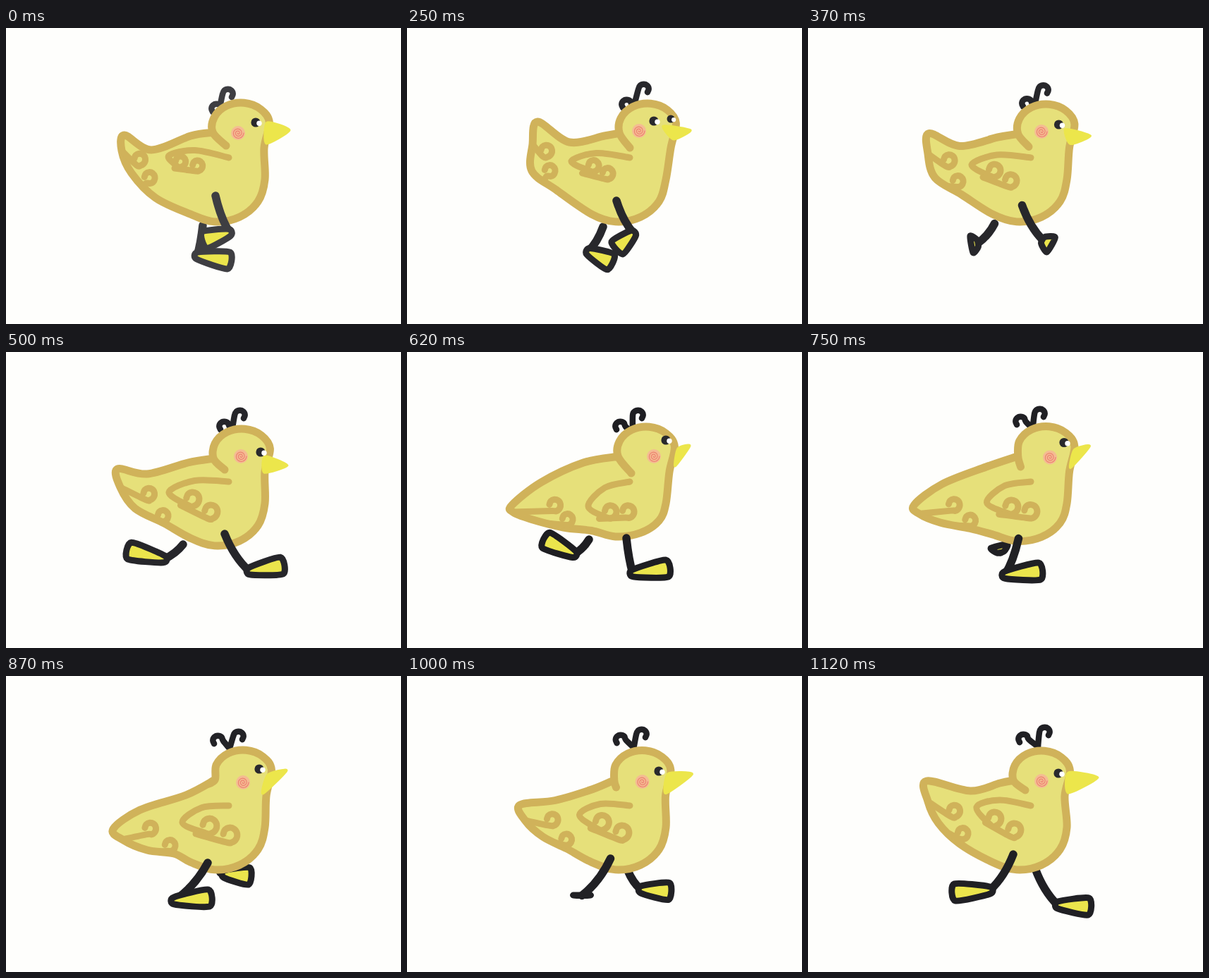
These frames come from a looping animation (560x420 px, 1.25 s). An HTML page:

```html
<!DOCTYPE html>
<html lang="en">
<head>
<meta charset="utf-8">
<title>Running duckling</title>
<style>
html, body { margin: 0; width: 100%; height: 100%; overflow: hidden; background: #fefefc; }
svg { display: block; width: 100%; height: 100%; }
path { fill: none; stroke-linecap: round; stroke-linejoin: round; }
#duck { filter: blur(.7px); }
.leg { stroke-width: 11.5; }
.hair { stroke-width: 8.5; }
.foot { fill: #ebe54c; stroke-width: 9; }
.body { fill: #e6e07a; stroke: #d0b25a; stroke-width: 11; }
.curl { stroke: #d0b25a; stroke-width: 9; }
.beak { fill: #ece64b; stroke: #ece64b; stroke-width: 3; }
.swirl { stroke: #ee8272; stroke-width: 1.2; }
</style>
</head>
<body>
<svg id="stage" viewBox="0 0 560 420"><g id="duck"></g></svg>
<script>
const LOOP = 1250;
// start time and pose; halves lie between two key poses
const STEPS = [[0, 0], [250, 1], [370, 1.5], [500, 2], [620, 3], [750, 3.5], [870, 4], [1000, 4.5], [1120, 5]];

// tail: two curl centres; wing: left edge and two curl centres;
// hair: root, right and left curl centres; legs: hip, heel, middle of the toes
const POSES = [
  {
    head: [333, 140], neck: [312, 167], back: [[206, 173], [262, 153]], tip: [168, 152],
    rear: [[212, 241], [178, 206], [164, 174]], depth: 60,
    tail: [[189, 186], [203, 212]], wing: [[231, 181], [247, 189], [271, 195]], curl: 8.5,
    hair: [[304, 108], [315, 94], [298, 115]], beak: [[370, 134], [402, 145], [369, 164]],
    near: [[297, 238], [317, 290], [281, 301]], far: [[279, 280], [271, 323], [316, 330]],
    eye: [354, 134], cheek: [329, 149], ink: 62
  },
  {
    head: [341, 141], neck: [316, 170], back: [[230, 162], [280, 153]], tip: [185, 133],
    rear: [[212, 230], [177, 203], [178, 165]], depth: 60,
    tail: [[197, 174], [202, 202]], wing: [[233, 189], [264, 195], [284, 206]], curl: 9,
    hair: [[323, 106], [336, 87], [311, 109]], beak: [[363, 139], [402, 145], [378, 158]],
    near: [[297, 245], [321, 291], [298, 312]], far: [[278, 282], [257, 317], [289, 332]],
    eye: [350, 132], farEye: [374, 129], cheek: [329, 146], ink: 40
  },
  {
    head: [334, 143], neck: [310, 167], back: [[200, 173], [258, 157]], tip: [158, 166],
    rear: [[224, 243], [183, 222], [162, 192]], depth: 60,
    tail: [[202, 201], [222, 232]], wing: [[231, 199], [264, 208], [290, 226]], curl: 11,
    hair: [[321, 108], [332, 90], [309, 106]], beak: [[367, 148], [399, 161], [366, 171]],
    near: [[310, 258], [345, 311], [391, 303]], far: [[251, 273], [224, 294], [175, 282]],
    eye: [361, 142], cheek: [333, 148], ink: 38
  },
  {
    head: [339, 140], neck: [318, 172], back: [[190, 185], [250, 157]], tip: [149, 217],
    rear: [[222, 249], [175, 237], [150, 227]], depth: 47,
    tail: [[209, 217], [227, 237]], wing: [[257, 219], [288, 226], [313, 226]], curl: 10,
    hair: [[320, 114], [328, 90], [302, 106]], beak: [[384, 137], [401, 133], [380, 162]],
    near: [[311, 264], [320, 314], [369, 307]], far: [[258, 266], [237, 287], [197, 267]],
    eye: [367, 125], cheek: [350, 148], ink: 30
  },
  {
    head: [336, 139], neck: [285, 154], back: [[190, 190], [255, 169]], tip: [152, 217],
    rear: [[238, 252], [200, 247], [165, 232]], depth: 60,
    tail: [[204, 216], [232, 240]], wing: [[250, 208], [288, 212], [317, 225]], curl: 12,
    hair: [[317, 103], [330, 86], [300, 92]], beak: [[371, 140], [398, 134], [364, 167]],
    near: [[286, 265], [238, 319], [288, 315]], far: [[304, 279], [309, 281], [345, 284]],
    eye: [359, 132], cheek: [336, 151], ink: 34
  },
  {
    head: [331, 140], neck: [308, 162], back: [[230, 163], [272, 152]], tip: [168, 149],
    rear: [[215, 238], [185, 209], [170, 178]], depth: 60,
    tail: [[207, 191], [219, 223]], wing: [[239, 186], [264, 202], [292, 218]], curl: 11,
    hair: [[326, 100], [336, 80], [305, 90]], beak: [[369, 137], [411, 144], [369, 166]],
    near: [[291, 253], [258, 304], [208, 307]], far: [[322, 273], [354, 325], [398, 327]],
    eye: [355, 138], cheek: [331, 149], ink: 32
  }
];

const stage = document.getElementById('stage');
const duck = document.getElementById('duck');

function add(tag, attrs, parent = duck) {
  const node = document.createElementNS('http://www.w3.org/2000/svg', tag);
  set(node, attrs);
  return parent.appendChild(node);
}

function set(node, attrs) {
  for (const key in attrs) node.setAttribute(key, attrs[key]);
}

const shift = ([x, y], dx, dy) => [x + dx, y + dy];

// blend numbers, points and lists of points alike
const mix = (a, b, k) => Array.isArray(a) ? a.map((v, i) => mix(v, b[i], k)) : a + (b - a) * k;

function poseAt(at) {
  const i = Math.floor(at), a = POSES[i], b = POSES[i + 1];
  if (at === i) return a;
  const pose = {};
  for (const key in a) if (key in b) pose[key] = mix(a[key], b[key], at - i);
  return pose;
}

// points along an arc whose radius ends at `end` times its size
function arc([x, y], rx, ry, from, turn, count, end = 1) {
  return Array.from({ length: count }, (_, i) => {
    const k = i / (count - 1), a = (from + turn * k) * Math.PI / 180, s = 1 + (end - 1) * k;
    return [x + rx * s * Math.cos(a), y + ry * s * Math.sin(a)];
  });
}

// smooth curve through the points
function curve(pts, closed) {
  const n = pts.length;
  const pt = i => pts[closed ? (i + n) % n : Math.max(0, Math.min(n - 1, i))];
  const pull = closed ? 9 : 6;
  let d = 'M' + pt(0);
  for (let i = 0; i < (closed ? n : n - 1); i++) {
    const [p, a, b, q] = [pt(i - 1), pt(i), pt(i + 1), pt(i + 2)];
    const c1 = a.map((v, k) => v + (b[k] - p[k]) / pull);
    const c2 = b.map((v, k) => v - (q[k] - a[k]) / pull);
    d += `C${c1} ${c2} ${b}`;
  }
  return closed ? d + 'Z' : d;
}

const hook = (lead, center, r) => curve([...lead, ...arc(center, r, r, 115, -290, 8, .75)]);

const tuft = (root, center, from, turn) => curve([root, ...arc(center, 8, 8, from, turn, 6, .8)]);

function bodyPath(p) {
  const head = arc(p.head, 41, 34, 166, 184, 6);
  const throat = [p.head[0] + 33, 170];
  const belly = arc([300, 215], 67, p.depth, 0, 125, 5);
  return curve([p.neck, ...head, throat, ...belly, ...p.rear, p.tip, ...p.back, head[0]]);
}

function legPath([hip, heel]) {
  const bend = mix(mix(hip, heel, .5), [hip[0], heel[1]], .25);
  return `M${hip}Q${bend} ${heel}`;
}

// a wedge, narrow at the heel and wide at the toes
function footPath([, heel, toe]) {
  const dx = toe[0] - heel[0], dy = toe[1] - heel[1], len = Math.hypot(dx, dy);
  const side = (pt, w) => shift(pt, -dy / len * w, dx / len * w);
  return curve([side(heel, 5), side(toe, 12), side(toe, -12), side(heel, -5)], true);
}

// back to front: class, path rule
const SHAPES = [
  ['leg', p => legPath(p.far)],
  ['foot', p => footPath(p.far)],
  ['hair', p => tuft(p.hair[0], p.hair[1], 180, 220)],
  ['hair', p => tuft(p.hair[0], p.hair[2], 0, -220)],
  ['body', bodyPath],
  ['curl', p => hook([p.rear[2]], p.tail[0], 9.5)],
  ['curl', p => hook([mix(p.rear[0], p.rear[1], .5)], p.tail[1], 9)],
  ['curl', ({ wing: [left, inner], curl }) => {
    const end = [316, 184];
    return hook([end, shift(mix(end, left, .5), -6, -9), left], inner, curl);
  }],
  ['curl', ({ wing: [left, inner, outer], curl }) =>
    hook([shift(mix(left, inner, .5), 0, 14)], outer, curl)],
  ['beak', p => curve(p.beak, true)],
  ['leg', p => legPath(p.near)],
  ['foot', p => footPath(p.near)]
].map(([name, rule]) => ({ node: add('path', { class: name }), rule, inked: /leg|foot|hair/.test(name) }));

function addEye(r) {
  const eye = add('g', {});
  add('circle', { r, fill: '#29292d' }, eye);
  add('circle', { cx: r * .75, cy: 1.2, r: r * .56, fill: '#fff' }, eye);
  return eye;
}
const eye = addEye(6.6), farEye = addEye(5.5);

const cheek = add('g', {}, stage);
add('circle', { r: 10, fill: '#f4bc92' }, cheek);
add('path', { class: 'swirl', d: curve(arc([0, 0], 8, 8, 0, 900, 40, .08)) }, cheek);

function place(node, pt) {
  set(node, { visibility: pt ? 'visible' : 'hidden' });
  if (pt) set(node, { transform: `translate(${pt})` });
}

function draw(at) {
  const pose = poseAt(at), ink = `rgb(${pose.ink},${pose.ink},${pose.ink + 4})`;
  for (const { node, rule, inked } of SHAPES) {
    set(node, { d: rule(pose) });
    if (inked) set(node, { stroke: ink });
  }
  place(eye, pose.eye);
  place(farEye, pose.farEye);
  place(cheek, pose.cheek);
}

const start = performance.now();
let shown = -1;

function tick() {
  const t = Math.max(0, performance.now() - start) % LOOP;
  const at = STEPS.filter(step => step[0] <= t).pop()[1];
  if (at !== shown) draw(shown = at);
  requestAnimationFrame(tick);
}
tick();
</script>
</body>
</html>
```
